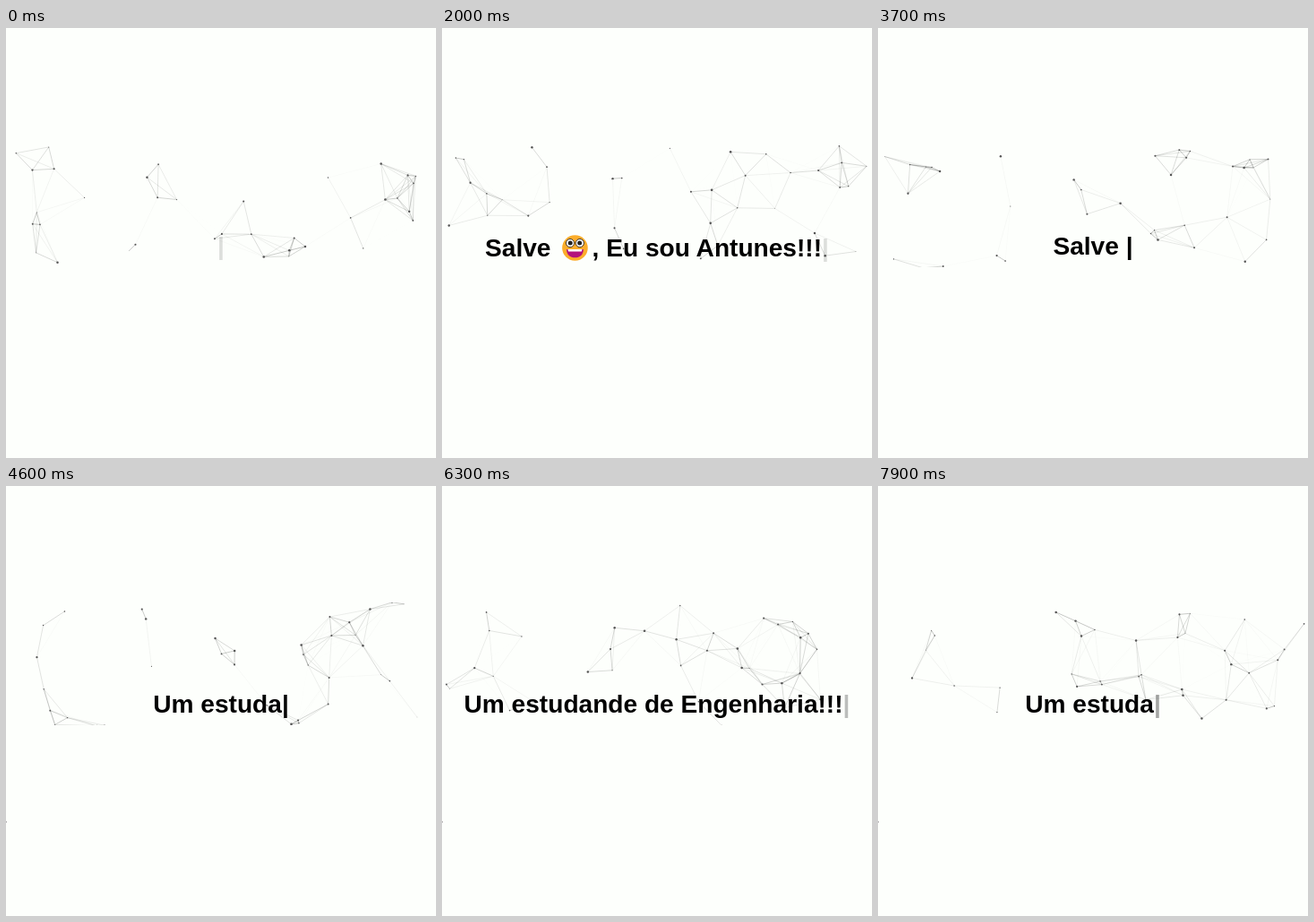
Recreate the animation shown at these times as an HTML page. Size 480 by 480 pixels, loop 8000 ms.

```html
<!DOCTYPE html>
<html lang="pt">
<head>
<meta charset="utf-8">
<title>Salve</title>
<style>
  html, body { margin: 0; width: 100%; height: 100%; overflow: hidden; background: #fdfffc; }
  svg { display: block; width: 100%; height: 100%; }
  text { font: bold 28.1px "Liberation Sans", Arial, sans-serif; white-space: pre; }
</style>
</head>
<body>
<svg viewBox="0 0 480 480">
  <clipPath id="band"><rect y="130" width="480" height="137"/></clipPath>
  <g clip-path="url(#band)">
    <g id="links" stroke="#000" stroke-width=".6"></g>
    <g id="dots" fill="#555"></g>
  </g>
  <rect id="speck" y="374" width="1" height="2" fill="#bbb"/>
  <g id="emoji">
    <circle r="14.3" fill="#fcad2b"/>
    <g fill="#fff" stroke="#2b2118" stroke-width=".9">
      <circle cx="-5.4" cy="-5.4" r="4.6"/>
      <circle cx="5.4" cy="-5.4" r="4.6"/>
    </g>
    <g fill="#222">
      <circle cx="-5.2" cy="-5.4" r="2.5"/>
      <circle cx="5.2" cy="-5.4" r="2.5"/>
    </g>
    <path d="M-9.4 1.4H9.4C9.4 7.6 5.4 10.8 0 10.8S-9.4 7.6 -9.4 1.4Z" fill="#b3127c"/>
    <path d="M-8 1.4H8L7.4 4H-7.4Z" fill="#fff"/>
  </g>
  <text id="head"></text>
  <text id="tail"></text>
  <text id="cursor">|</text>
</svg>
<script>
const LOOP = 8000, EMOJI_WIDTH = 38.3;
const TYPE_STEP = 50, ERASE_STEP = 64;
const TOP = 130, WIDTH = 480, HEIGHT = 137, MARGIN = 1.5;
const COUNT = 36, LINK = 64, LINK_ALPHA = .42, MAX_SPEED = 37;
const el = id => document.getElementById(id);
const [links, dots, speck, emoji, head, tail, cursor] =
  ["links", "dots", "speck", "emoji", "head", "tail", "cursor"].map(el);

// "*" stands for the drawn emoji
const phrases = [
  { text: "Salve *, Eu sou Antunes!!!", type: 100, erase: 2410 },
  { text: "Um estudande de Engenharia!!!", type: 4130, erase: 6600 }
];

let seed = 7919;
const random = () => (seed = seed * 16807 % 2147483647) / 2147483647;
const between = (low, high) => low + random() * (high - low);

const particles = Array.from({ length: COUNT }, () => ({
  x: between(0, WIDTH),
  y: between(0, HEIGHT),
  r: between(.3, 1.3),
  vx: between(-MAX_SPEED, MAX_SPEED),
  vy: between(-MAX_SPEED, MAX_SPEED)
}));

function wrap(value, size) {
  const span = size + 2 * MARGIN;
  return ((value + MARGIN) % span + span) % span - MARGIN;
}

function drawParticles(t) {
  const points = particles.map(p => ({
    x: wrap(p.x + p.vx * t / 1000, WIDTH),
    y: TOP + wrap(p.y + p.vy * t / 1000, HEIGHT),
    r: p.r
  }));
  let lines = "";
  points.forEach((a, i) => points.slice(i + 1).forEach(b => {
    const alpha = LINK_ALPHA * (1 - Math.hypot(a.x - b.x, a.y - b.y) / LINK);
    if (alpha > 0)
      lines += `<line x1="${a.x}" y1="${a.y}" x2="${b.x}" y2="${b.y}" opacity="${alpha}"/>`;
  }));
  links.innerHTML = lines;
  dots.innerHTML = points.map(p => `<circle cx="${p.x}" cy="${p.y}" r="${p.r}"/>`).join("");
}

function typedText(t) {
  const { text, type, erase } = phrases[t < phrases[1].type ? 0 : 1];
  const typed = Math.min(text.length, Math.max(0, Math.floor((t - type) / TYPE_STEP)));
  const erased = Math.max(0, Math.floor((t - erase) / ERASE_STEP));
  return text.slice(0, Math.max(0, typed - erased));
}

// The CSS "ease" curve, solved by bisection
function ease(x) {
  const curve = (s, a, b) => 3 * s * (1 - s) ** 2 * a + 3 * s * s * (1 - s) * b + s ** 3;
  let low = 0, high = 1;
  for (let i = 0; i < 20; i++) {
    const mid = (low + high) / 2;
    if (curve(mid, .25, .25) < x) low = mid; else high = mid;
  }
  return curve(low, .1, 1);
}

// Darkest at 710 ms of every second, gone at 210 ms
function blink(t) {
  const phase = (t + 790) % 1000 / 500;
  return phase < 1 ? ease(phase) : 1 - ease(phase - 1);
}

function place(node, x, y) {
  node.setAttribute("x", x);
  node.setAttribute("y", y);
}

function drawText(t) {
  const [before, after] = typedText(t).split("*");
  const hasEmoji = after !== undefined;
  head.textContent = before;
  tail.textContent = after || "";
  const width = node => node.textContent ? node.getComputedTextLength() : 0;
  const headWidth = width(head), tailWidth = width(tail);
  const gap = hasEmoji ? EMOJI_WIDTH : 0;
  const left = (WIDTH - headWidth - gap - tailWidth - width(cursor)) / 2;
  const baseline = hasEmoji ? 255.3 : 253.3;
  const afterHead = left + headWidth;
  place(head, left, baseline);
  place(tail, afterHead + gap, baseline);
  place(cursor, afterHead + gap + tailWidth, baseline);
  cursor.setAttribute("opacity", blink(t));
  emoji.setAttribute("display", hasEmoji ? "inline" : "none");
  emoji.setAttribute("transform", `translate(${afterHead + gap / 2} ${baseline - 9.8})`);
}

function draw(t) {
  drawParticles(t);
  drawText(t);
  speck.setAttribute("opacity", t >= 4100 ? 1 : 0);
}

const begin = performance.now();
function frame() {
  draw((performance.now() - begin) % LOOP);
  requestAnimationFrame(frame);
}
draw(0);
requestAnimationFrame(frame);
</script>
</body>
</html>
```
